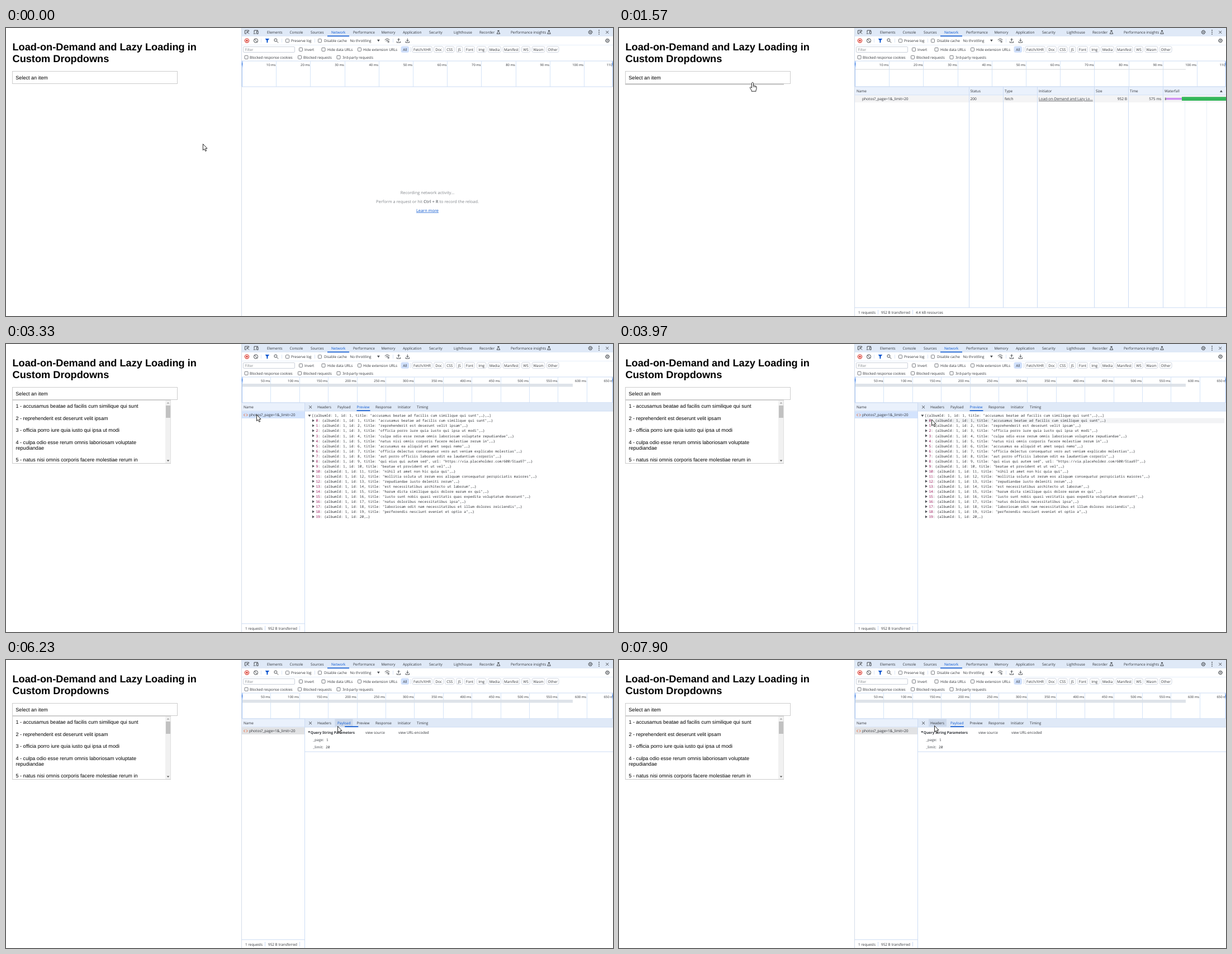
Recreate the animation shown at these times as an HTML page. Size 1086 px wide and 515 px high, loop 8000 ms.

```html
<!DOCTYPE html>
<html lang="en">
<head>
<meta charset="utf-8">
<title>Lazy loading dropdown</title>
<style>
html, body { margin: 0; width: 100%; height: 100%; overflow: hidden; background: #fff; }
svg { display: block; }
text { font: 6.4px "Open Sans", "Noto Sans", sans-serif; fill: #303338; text-rendering: geometricPrecision; white-space: pre; }
.page { font: 9.08px "Liberation Sans", Arial, sans-serif; fill: #000; }
.head { font: bold 18.2px "Liberation Sans", Arial, sans-serif; fill: #000; }
.mono { font: 6.22px "Noto Sans Mono", "DejaVu Sans Mono", monospace; }
.row { font-size: 6.6px; }
.note { font-size: 7.4px; fill: #84888d; }
.tick { font-size: 5.9px; }
.mid { text-anchor: middle; }
.end { text-anchor: end; }
.chip { font-weight: 500; text-anchor: middle; }
.bold { font-weight: 700; }
.blue { fill: #0b57d0; }
.grey { fill: #80868b; }
.key { fill: #8e004b; }
.link { text-decoration: underline; }
.ico { fill: none; stroke: #474b50; stroke-width: 1; }
</style>
</head>
<body>
<svg id="stage" xmlns="http://www.w3.org/2000/svg" width="1086" height="515"></svg>
<script>
const LOOP = 8000;
const LINE = '#ccdcf4', BAR = '#dfe9f7';
const esc = s => s.replace(/&/g, '&amp;').replace(/</g, '&lt;');
const rect = (x, y, w, h, fill, more = '') => `<rect x="${x}" y="${y}" width="${w}" height="${h}" fill="${fill}" ${more}/>`;
const vline = (x, y, h, c = LINE) => rect(x, y, 1, h, c);
const hline = (x, y, w, c = LINE) => rect(x, y, w, 1, c);
const path = (d, more = 'class="ico"') => `<path d="${d}" ${more}/>`;
const solid = (d, c) => path(d, `fill="${c}"`);
const base = (x, y, s, cls = '') => `<text x="${x}" y="${y}" class="${cls}">${esc(s)}</text>`;
// y is the middle of the capital letters
const label = (x, y, s, cls) => base(x, y + 2.3, s, cls);
const group = (id, body) => `<g id="${id}">${body}</g>`;
const at = (x, y, body) => `<g transform="translate(${x} ${y})">${body}</g>`;

const check = (x, y, s, tx) =>
  rect(x + .5, y - 3, 6, 6, '#fff', 'rx="1" stroke="#6a6e73" stroke-width=".9"') + label(tx, y, s);
const flask = x => at(x, 7.5, path('M-1.5-3h3M-.8-3v2.2L-2.8 2.8h5.6L.8-.8V-3'));
const gear = (x, y) => at(x, y,
  '<circle r="2.7" class="ico" stroke-width="1.2"/><circle r="3.5" class="ico" stroke-dasharray="1.37" stroke-width="1.2"/><circle r="1" fill="#474b50"/>');
const cross = (x, y) => path(`M${x - 2.4} ${y - 2.4}l4.8 4.8m0-4.8l-4.8 4.8`);

function page() {
  return base(11.5, 39.8, 'Load-on-Demand and Lazy Loading in', 'head') +
    base(11.5, 60.6, 'Custom Dropdowns', 'head') +
    rect(11.5, 77.5, 295, 22, '#fff', 'stroke="#ccc"') +
    base(17.3, 91.6, 'Select an item', 'page');
}

function dropdown() {
  const lines = [
    [114.2, '1 - accusamus beatae ad facilis cum similique qui sunt'],
    [135.7, '2 - reprehenderit est deserunt velit ipsam'],
    [157.2, '3 - officia porro iure quia iusto qui ipsa ut modi'],
    [178.7, '4 - culpa odio esse rerum omnis laboriosam voluptate'],
    [188.9, 'repudiandae'],
    [210.4, '5 - natus nisi omnis corporis facere molestiae rerum in']
  ];
  return rect(11.5, 100.5, 283, 113, '#fff', 'stroke="#ccc"') +
    lines.map(([y, s]) => base(17.5, y, s, 'page')).join('') +
    rect(285, 101, 9.5, 112, '#f1f1f1') + rect(286, 110, 8, 22, '#c1c1c1') +
    solid('M287.7 106.5h4.6l-2.3-2.6z', '#a3a3a3') + solid('M287.7 207.5h4.6l-2.3 2.6z', '#505050');
}

function toolbars() {
  const tabs = [[467, 'Elements'], [507.5, 'Console'], [545, 'Sources'], [582, 'Network', 'blue'],
    [621, 'Performance'], [671.5, 'Memory'], [710, 'Application'], [757, 'Security'],
    [801, 'Lighthouse'], [847, 'Recorder'], [903, 'Performance insights']];
  const chips = [[726, 37, 'Fetch/XHR'], [765, 18, 'Doc'], [785, 17.5, 'CSS'], [805, 12.5, 'JS'],
    [820, 19, 'Font'], [842, 17.5, 'Img'], [862, 24, 'Media'], [888.5, 31, 'Manifest'],
    [922, 16, 'WS'], [940.5, 24, 'Wasm'], [967, 22.5, 'Other']];
  return rect(422, 0, 664, 15, BAR) + vline(421, 0, 515, '#d3dcea') +
    tabs.map(([x, s, c]) => label(x, 7.7, s, c)).join('') +
    rect(575, 13.6, 39, 1.6, '#0b57d0') + flask(881) + flask(971.5) +
    path('M434.5 6V4.2h-7v6H430M431 6.5l4 4M431 9.5v-3h3') +
    path('M444 8.5V4.2h7M442.7 10h4M448.5 5.7h2.6v4.6h-2.6z') +
    gear(1045.5, 7.5) + [4.2, 7.5, 10.8].map(y => `<circle cx="1061" cy="${y}" r=".9" fill="#474b50"/>`).join('') +
    cross(1075.7, 7.5) +
    hline(422, 30, 664, '#e6eefa') +
    '<circle cx="431" cy="22.6" r="3.6" class="ico" style="stroke:#d93025;stroke-width:1.2"/>' + rect(429.5, 21.1, 3, 3, '#d93025') +
    '<circle cx="447" cy="22.6" r="3.6" class="ico"/>' + path('M444.5 20l5 5.2') +
    solid('M463.7 19h7.4l-2.7 3.6v3.6h-2v-3.6z', '#0b57d0') +
    '<circle cx="482.4" cy="21.6" r="2.5" class="ico"/>' + path('M484.2 23.4l3 3') +
    [456, 493, 552, 692].map(x => vline(x, 19, 7, '#dbe6f7')).join('') +
    check(500, 22.7, 'Preserve log', 510) + check(558, 22.7, 'Disable cache', 569) +
    label(615.5, 22.7, 'No throttling') + solid('M664 20.8h4.8l-2.4 3.8z', '#474b50') +
    path('M677.8 21.3q4.2-3.6 8.4 0M679.5 23.3q2.5-2 5 0') +
    '<circle cx="684.2" cy="24.6" r="1.2" class="ico"/>' +
    path('M702.5 24v-4.8M700.3 21.2l2.2-2.2 2.2 2.2M699.3 24v2h6.4v-2') +
    path('M718.3 18.8v4.8M716.1 21.6l2.2 2.2 2.2-2.2M715.1 24v2h6.4v-2') + gear(1076, 22.6) +
    rect(424.5, 33.5, 92, 10, '#fff', 'rx="1.5" stroke="#ccd2dc"') + label(427.5, 38.5, 'Filter', 'grey') +
    check(524, 38.4, 'Invert', 534) + check(564.5, 38.4, 'Hide data URLs', 575) +
    check(629, 38.4, 'Hide extension URLs', 639) +
    rect(706.5, 32.5, 14.5, 11.5, '#d0e0fb', 'rx="3"') + label(713.8, 38.4, 'All', 'chip') + vline(723, 34, 9, '#dbe3ef') +
    chips.map(([x, w, s]) => rect(x + .5, 33, w - 1, 10.6, '#fff', 'rx="2.8" stroke="#ccd3df" stroke-width=".9"') +
      label(x + w / 2, 38.4, s, 'chip')).join('') +
    check(426.5, 52.3, 'Blocked response cookies', 436) + check(522, 52.3, 'Blocked requests', 532) +
    check(591.5, 52.3, '3rd-party requests', 602) + hline(422, 58.5, 664);
}

function ruler(gap, step) {
  let out = '';
  for (let k = 1; k * gap < 690; k++) {
    const x = 422 + k * gap;
    out += vline(Math.round(x), 59, 46, '#d5e4f8') + label(x - .8, 65.2, k * step + ' ms', 'tick end');
  }
  return out;
}

const handle = x => vline(x, 59, 46, '#a9c8f5') + rect(x - 1, 59, 3, 11, '#b9d2f8') + vline(x, 62, 5, '#4f86dc');

function emptyNote() {
  return label(754, 294.8, 'Recording network activity…', 'note mid') +
    `<text x="754" y="313.2" class="note mid">Perform a request or hit <tspan class="bold">Ctrl + R</tspan> to record the reload.</text>` +
    label(754, 326.4, 'Learn more', 'note mid blue link');
}

const icon = path('M427.6 124.7l-2.2 2.2 2.2 2.2M430 124.7l2.2 2.2-2.2 2.2', 'fill="none" stroke="#ea6a3c" stroke-width="1"');

function table() {
  const heads = [[425, 'Name'], [628.5, 'Status'], [690, 'Type'], [751, 'Initiator'], [853, 'Size'], [914, 'Time'], [976, 'Waterfall']];
  return rect(422, 105, 664, 395, '#fff') + rect(422, 105, 664, 15, '#eaf1fc') +
    hline(422, 104.5, 664) + hline(422, 119.5, 664) + rect(422, 120.5, 664, 12.5, '#f4f4f5') +
    heads.map(([x, s]) => label(x, 113, s)).join('') + solid('M1075 114.8h4.8l-2.4-3.8z', '#474b50') +
    [1012, 1051].map(x => vline(x, 120, 380, '#eaf0f8')).join('') +
    [626, 687, 748, 850, 911, 973].map(x => vline(x, 105, 395)).join('') +
    label(435, 127, 'photos?_page=1&_limit=20', 'row') + label(690, 127, 'fetch', 'row') +
    label(751, 127, 'Load-on-Demand and Lazy Lo…', 'row link') +
    group('pending', label(628.5, 127, '(pending)', 'row grey') + label(909, 127, '0 B', 'row end') +
      label(970.5, 127, 'Pending', 'row end') + footer('0 B transferred', '0 B resources')) +
    group('done', label(628.5, 127, '200', 'row') + label(909, 127, '952 B', 'row end') +
      base(970.5, 129.3, '', 'row end') + `<text id="time" x="970.5" y="129.3" class="row end"></text>` +
      rect(976.8, 124.5, 2, 4.5, '#7d8187') + rect(979, 124.8, 28, 3.6, '#cf8ef2') + rect(1007, 123.2, 79, 6.8, '#34b75a') +
      footer('952 B transferred', '4.4 kB resources')) +
    group('icon', icon);
}

function footer(sent, size) {
  return rect(422, 500, 664, 15, '#fff') + hline(422, 499.5, 664) + label(428, 508.2, '1 requests') +
    vline(463, 504, 8) + label(469, 508.2, sent) + vline(525, 504, 8) + label(531, 508.2, size || '');
}

const titles = ['accusamus beatae ad facilis cum similique qui sunt', 'reprehenderit est deserunt velit ipsam',
  'officia porro iure quia iusto qui ipsa ut modi', 'culpa odio esse rerum omnis laboriosam voluptate repudiandae',
  'natus nisi omnis corporis facere molestiae rerum in', 'accusamus ea aliquid et amet sequi nemo',
  'officia delectus consequatur vero aut veniam explicabo molestias', 'aut porro officiis laborum odit ea laudantium corporis',
  'qui eius qui autem sed', 'beatae et provident et ut vel', 'nihil at amet non hic quia qui',
  'mollitia soluta ut rerum eos aliquam consequatur perspiciatis maiores', 'repudiandae iusto deleniti rerum',
  'est necessitatibus architecto ut laborum', 'harum dicta similique quis dolore earum ex qui',
  'iusto sunt nobis quasi veritatis quas expedita voluptatum deserunt', 'natus doloribus necessitatibus ipsa',
  'laboriosam odit nam necessitatibus et illum dolores reiciendis', 'perferendis nesciunt eveniet et optio a'];
const ROW0 = 128, ROW_H = 9.05;

function preview() {
  let out = rect(535, 120, 551, 395, '#fff') + rect(547, 0, 536, 9, '#f2f3f5', 'id="hoverRow"') +
    solid('M540.4 126.4h5l-2.5 3.8z', '#474b50') +
    label(547, ROW0, `[{albumId: 1, id: 1, title: "${titles[0]}",…},…]`, 'mono');
  for (let i = 0; i < 20; i++) {
    const y = ROW0 + (i + 1) * ROW_H;
    const url = i === 8 ? ', url: "https://via.placeholder.com/600/51aa97"' : '';
    const body = i < 19 ? `{albumId: 1, id: ${i + 1}, title: "${titles[i]}"${url},…}` : '{albumId: 1, id: 20,…}';
    out += solid(`M548 ${y - 2.6}v5l3.8-2.5z`, '#474b50') +
      `<text x="554.4" y="${y + 2.3}" class="mono"><tspan class="key">${i}</tspan>: ${body}</text>`;
  }
  return out;
}

function payload() {
  return rect(535, 120, 551, 395, '#fff') + solid('M540.3 127.4h4l-2 3.2z', '#303338') +
    label(544.8, 129.3, 'Query String Parameters', 'bold') + label(643, 129.3, 'view source') +
    label(702, 129.3, 'view URL-encoded') +
    [['_page:', '1', 573], ['_limit:', '20', 572]].map(([k, v, x], i) =>
      `<text x="549.3" y="${145.4 + i * 12.4}" style="font-weight:600;fill:#6a6e73">${k}</text>` +
      base(x, 145.4 + i * 12.4, v, 'mono')).join('') + hline(535, 163.5, 551);
}

function details() {
  const tabs = [[557, 'Headers'], [593, 'Payload', 'tabPayload'], [627.5, 'Preview', 'tabPreview'],
    [661, 'Response'], [701, 'Initiator'], [735, 'Timing']];
  return rect(422, 105, 664, 410, '#fff') + rect(422, 105, 113, 15, '#eaf1fc') + hline(422, 104.5, 664) +
    hline(422, 119.5, 113) + label(425, 113, 'Name') +
    rect(422, 120.5, 113, 12.5, '#d3e3fd', 'id="picked"') + icon + label(435, 127, 'photos?_page=1&_limit=20', 'row') +
    footer('952 B transferred') + rect(535, 499, 551, 16, '#fff') +
    group('preview', preview()) + group('payload', payload()) +
    rect(535, 105, 551, 15, BAR) + hline(535, 119.5, 551) +
    rect(0, 105.5, 32, 13.5, '#ccd8ea', 'id="hoverTab"') + cross(544.6, 112.8) +
    tabs.map(([x, s, id]) => `<text x="${x}" y="115.3"${id ? ` id="${id}"` : ''}>${s}</text>`).join('') +
    rect(0, 118.4, 24, 1.6, '#0b57d0', 'id="mark"') + vline(534, 105, 410);
}

const arrow = path('M.5.5V11.6L3 9.4 4.9 13.4 6.7 12.6 4.9 8.7 8 8.4Z', 'fill="#fff" stroke="#111" stroke-width=".9"');
const hand = path('M0 .3C1 .3 1.5 1 1.5 1.8V6L2.6 5.8 3.6 6.5 4.6 6.4 5.4 7.1Q7 7 7 8.7V11.5C7 12.8 6 13.4 6 14.6V16.2H-1.8V14.8C-2.5 13-4 11.5-4.6 10-5 8.8-3.6 8-2.6 9L-1.5 10.2V1.8C-1.5 1-1 .3 0 .3Z',
  'fill="#fff" stroke="#111" stroke-width=".9" stroke-linejoin="round"') +
  path('M1.5 6v3M3.6 6.5v2.6M5.4 7.1v2.2', 'fill="none" stroke="#111" stroke-width=".7"');

document.getElementById('stage').innerHTML =
  rect(0, 0, 1086, 515, '#fff') + page() +
  group('closing', rect(11, 100, 284, 1.4, '#bdbdbd')) + group('list', dropdown()) + toolbars() +
  group('fine', ruler(61.2, 10)) + group('coarse', ruler(51.4, 50)) + hline(422, 104.5, 664) +
  group('thin', rect(422, 73.5, 592, 1, '#d5d7da')) + group('band', rect(422, 71, 592, 5.5, '#d9dee6', 'opacity=".85"')) +
  handle(422) + handle(1085) +
  group('empty', emptyNote()) + group('table', table()) + group('details', details()) +
  group('cursor', group('arrow', arrow) + group('hand', hand));

const ui = {};
document.querySelectorAll('[id]').forEach(n => ui[n.id] = n);
const show = (n, on) => n.style.display = on ? '' : 'none';

// pointer: time, x, y
const moves = [[0, 352, 207], [250, 318, 172], [520, 258, 116], [770, 239, 97], [1840, 239, 97], [2080, 306, 112],
  [2300, 457, 133], [2470, 444, 127], [2800, 444, 127], [2900, 448, 126], [3700, 448, 126], [3970, 559, 134.5],
  [4070, 560, 135], [4240, 560, 135], [4400, 557, 139], [4640, 557, 139], [4830, 536, 210], [5030, 562, 309],
  [5130, 571, 302.8], [5400, 571, 302.8], [5700, 580, 210], [6000, 593, 118], [6230, 593, 118], [6500, 600, 138],
  [6800, 566, 150], [7030, 540, 146], [7250, 570, 152], [7500, 716, 130], [7700, 640, 124], [7900, 564, 117], [8000, 564, 117]];

function pointer(t) {
  const i = moves.findIndex(m => m[0] > t);
  const [t0, x0, y0] = moves[i - 1], [t1, x1, y1] = moves[i];
  const u = (t - t0) / (t1 - t0), e = u * (.5 + u * (1.5 - u));
  return [x0 + (x1 - x0) * e, y0 + (y1 - y0) * e];
}

function draw(t) {
  const sent = t >= 1030, got = t >= 1570, filled = t >= 1600, open = t >= 3330, params = t >= 6230;
  show(ui.closing, sent && !filled);
  show(ui.list, filled);
  show(ui.fine, !filled);
  show(ui.coarse, filled);
  show(ui.thin, got && !open);
  show(ui.band, open);
  show(ui.empty, !sent);
  show(ui.table, sent && !open);
  show(ui.pending, !got);
  show(ui.done, got);
  show(ui.icon, filled);
  ui.time.textContent = filled ? '573 ms' : '575 ms';
  show(ui.details, open);
  show(ui.preview, !params);
  show(ui.payload, params);
  ui.picked.setAttribute('fill', params ? '#e1e2e4' : '#d3e3fd');
  ui.tabPreview.setAttribute('class', params ? '' : 'blue');
  ui.tabPayload.setAttribute('class', params ? 'blue' : '');
  const slide = Math.min(1, Math.max(0, (t - 6160) / 115));
  ui.mark.setAttribute('x', params ? 627.5 - 34.5 * slide : 627.5);

  const [x, y] = pointer(t);
  const row = Math.floor((y + 2 - ROW0 + ROW_H / 2) / ROW_H);
  show(ui.hoverRow, x > 535 && row >= 0 && row <= 20);
  ui.hoverRow.setAttribute('y', ROW0 - 4.5 + row * ROW_H);
  const tab = y < 119.2 ? [554, 588.5].find(l => x >= l && x < l + 32) : 0;
  show(ui.hoverTab, !!tab);
  ui.hoverTab.setAttribute('x', tab || 0);

  const link = x < 306 && y < (sent ? 214 : 100);
  show(ui.hand, link);
  show(ui.arrow, !link);
  ui.cursor.setAttribute('transform', `translate(${x.toFixed(1)} ${y.toFixed(1)})`);
}

const start = performance.now();
function tick() {
  draw((performance.now() - start) % LOOP);
  requestAnimationFrame(tick);
}
tick();
</script>
</body>
</html>
```
